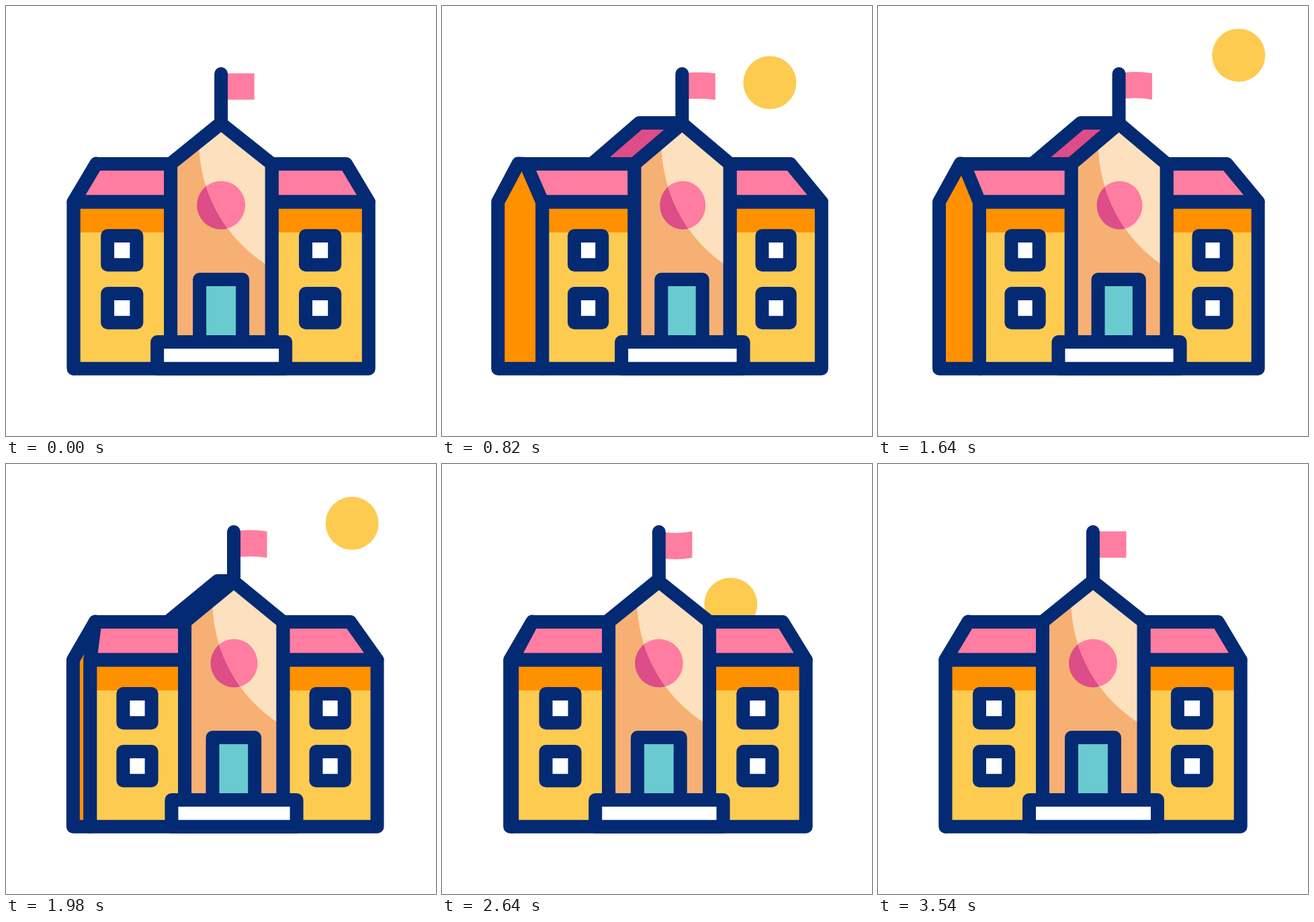
Recreate the animation shown at these times as an HTML page with a canvas. Size 640 px wide and 640 px high, loop 3600 ms.

```html
<!DOCTYPE html>
<html lang="en">
<head>
<meta charset="utf-8">
<title>School</title>
<style>
  html, body { margin: 0; width: 100%; height: 100%; overflow: hidden; background: #fff; }
  canvas { display: block; width: 640px; height: 640px; }
</style>
</head>
<body>
<canvas id="stage" width="640" height="640"></canvas>
<script>
const ctx = document.getElementById('stage').getContext('2d');
const LOOP = 3600;
const NAVY = '#042a74', PINK = '#ff7da0', ROSE = '#dd4d87', YELLOW = '#fdcb50',
  ORANGE = '#ff9000', TAN = '#f6b074', CREAM = '#fde0be', TEAL = '#69cad0';
const TOP = 235, EAVE = 291.5, BASE = 539.7, PEAK = 175;

const clamp = v => Math.min(1, Math.max(0, v));
const span = (t, start, length) => clamp((t - start) / length);
const mix = (a, b, k) => a + (b - a) * k;
const rest = u => (1 - u) ** 4;

// Turn out quickly, then back from a given moment.
const turn = (t, back, length) =>
  (1 - rest(span(t, 0, 1500))) * rest(span(t, back, length));

// The flag bends up and down, one swing per 600 ms.
const SWINGS = [0, -1, 1, -1, 1, 0, 0];
function flagBend(t) {
  const i = Math.min(5, Math.floor(t / 600));
  const k = (1 - Math.cos(Math.PI * (t / 600 - i))) / 2;
  return 3.6 * mix(SWINGS[i], SWINGS[i + 1], k);
}

function trace(points, closed) {
  ctx.beginPath();
  points.forEach(([x, y]) => ctx.lineTo(x, y));
  if (closed) ctx.closePath();
}
function fill(color, points) {
  trace(points, true);
  ctx.fillStyle = color;
  ctx.fill();
}
function line(points, closed = false) {
  trace(points, closed);
  ctx.stroke();
}
function shape(color, points) {
  fill(color, points);
  line(points, true);
}
const box = (x1, y1, x2, y2) => [[x1, y1], [x2, y1], [x2, y2], [x1, y2]];

function disc(color, x, y, rx, ry = rx) {
  ctx.beginPath();
  ctx.ellipse(x, y, rx, ry, 0, 0, 2 * Math.PI);
  ctx.fillStyle = color;
  ctx.fill();
}

function drawSun(t) {
  const up = 1 - (1 - span(t, 295, 1233)) ** 2;
  const k = clamp(up - span(t, 1455, 1351) ** 2);
  if (k <= 0) return;
  const curve = (a, b, c) => mix(mix(a, b, k), mix(b, c, k), k);
  disc(YELLOW, curve(405, 455, 540), curve(275, 118, 71.5), 39.5);
}

function drawFlag(x, t) {
  const bend = 2 * flagBend(t), end = x + 49.5, mid = x + 24.7;
  ctx.beginPath();
  ctx.moveTo(x, 100.3);
  ctx.quadraticCurveTo(mid, 100.3 + bend, end, 100.3);
  ctx.lineTo(end, 139.5);
  ctx.quadraticCurveTo(mid, 139.5 + bend, x, 139.5);
  ctx.fillStyle = PINK;
  ctx.fill();
  line([[x, 101], [x, PEAK]]);
}

function drawWing(outer, corner, inner) {
  fill(YELLOW, box(outer, EAVE, inner, BASE));
  fill(ORANGE, box(outer, EAVE, inner, 337));
  shape(PINK, [[corner, TOP], [inner, TOP], [inner, EAVE], [outer, EAVE]]);
  line(box(outer, EAVE, inner, BASE), true);
}

function drawWindows(x, half) {
  for (const y of [342, 428]) shape('#fff', box(x - half, y, x + half, y + 43.3));
}

function drawGable(left, apex, right, turned) {
  const front = [[left, TOP], [apex, PEAK], [right, TOP], [right, BASE], [left, BASE]];
  const sx = (right - left) / 150.5;
  const shade = () => {
    ctx.beginPath();
    ctx.ellipse(apex + 186 * sx, 201, 219 * sx, 219, 0, 0, 2 * Math.PI);
  };
  const badge = [apex + turned, 296.5, 36 * sx, 36];

  fill(TAN, front);
  disc(ROSE, ...badge);
  ctx.save();
  trace(front, true);
  ctx.clip();
  shade();
  ctx.clip();
  fill(CREAM, front);
  disc(PINK, ...badge);
  ctx.restore();
  line(front, true);
}

function draw(t) {
  const face = turn(t, 1635, 2100);
  const side = turn(t, 1500, 1000);
  const ridge = turn(t, 1500, 1400);

  const left = 100.5 + 51 * face, right = 539.7 + 26.3 * face;
  const inL = 245 + 43.3 * face, inR = 395.5 + 34.5 * face;
  const apex = 320 + 39 * face;
  const cornerL = 134.4 - 9.9 * ridge, cornerR = 506 + 13 * face;
  const sideX = Math.min(left, 101.2 - 18.7 * side);
  const sideTop = 134.4 - 21.8 * side;
  const backApex = 320 - 27.5 * ridge, backEave = 245 - 23 * ridge;

  ctx.fillStyle = '#fff';
  ctx.fillRect(0, 0, 640, 640);
  ctx.strokeStyle = NAVY;
  ctx.lineWidth = 20;
  ctx.lineJoin = ctx.lineCap = 'round';

  drawSun(t);
  drawFlag(apex, t);
  shape(ROSE, [[backApex, PEAK - 1], [apex, PEAK - 1], [inL, TOP], [backEave, TOP]]);
  shape(ORANGE, [[sideX, BASE], [sideX, EAVE], [sideTop, TOP - 0.5],
    [cornerL, TOP], [left, EAVE], [left, BASE]]);

  drawWing(left, cornerL, inL);
  drawWing(right, cornerR, inR);
  const half = 21.6 - face;
  drawWindows(172.6 + 47 * face, half);
  drawWindows(467.5 + 30.9 * face, half);

  drawGable(inL, apex, inR, face);
  shape(TEAL, box(288 + 40 * face, 407, 352 + 37.3 * face, 500));
  shape('#fff', box(225 + 44 * face, 500, 416 + 34 * face, BASE));
}

function tick() {
  draw(performance.now() % LOOP);
  requestAnimationFrame(tick);
}
tick();
</script>
</body>
</html>
```
